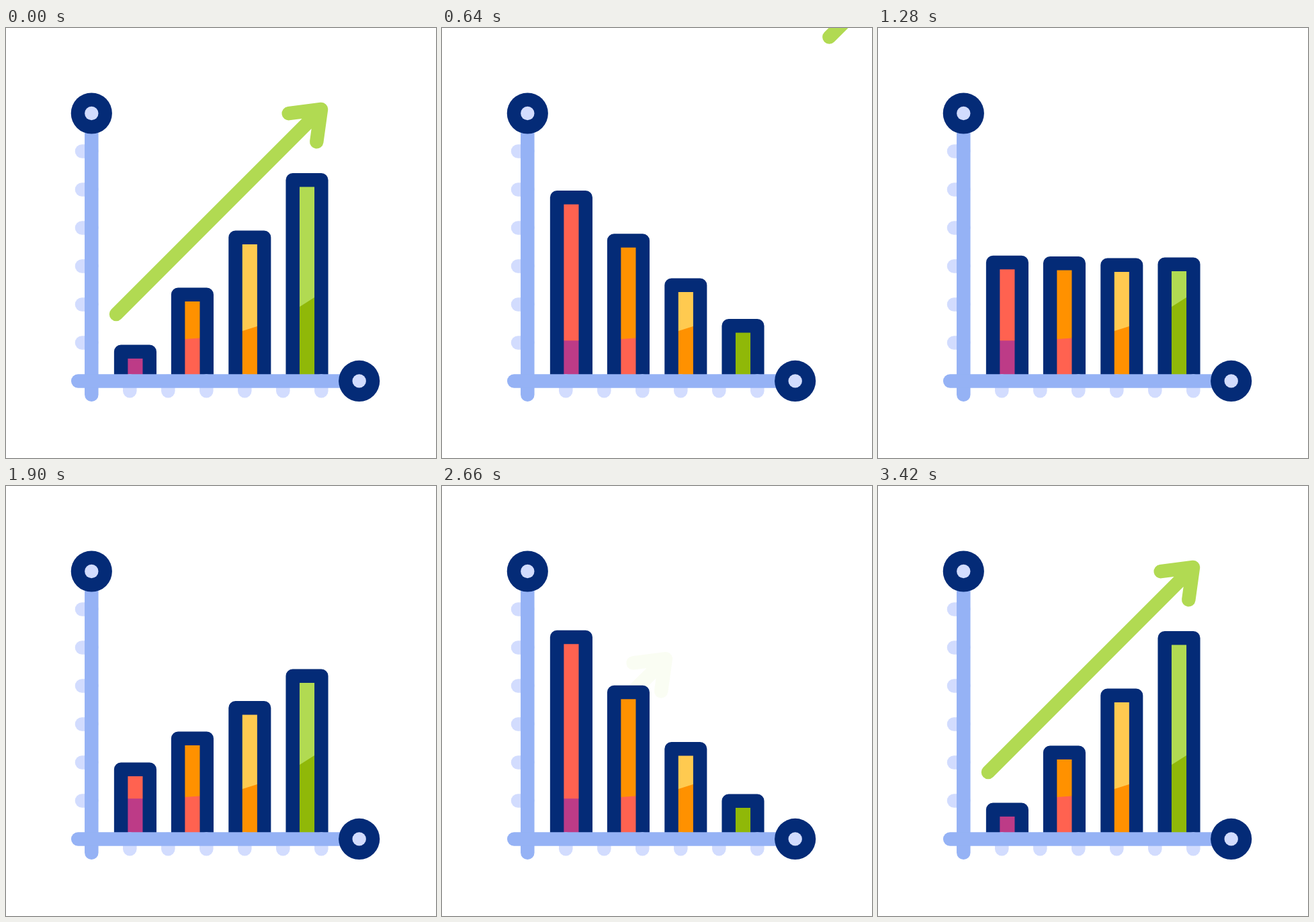
These frames come from a looping animation (640x640 px, 3.62 s). An HTML page with a canvas:

```html
<!DOCTYPE html>
<html lang="en">
<head>
<meta charset="utf-8">
<title>Growth chart</title>
<style>
  html, body { margin: 0; width: 100%; height: 100%; overflow: hidden; background: #fff; }
  canvas { display: block; width: 100vmin; height: 100vmin; }
</style>
</head>
<body>
<canvas id="stage" width="640" height="640"></canvas>
<script>
const ctx = document.getElementById('stage').getContext('2d');
const LOOP = 3620, END = 3420, WIDTH = 20.5, BASE = 515.5;
const NAVY = '#042b77', BLUE = '#95b2f5', PALE = '#d2dcfe', GREEN = '#b1da52';

// x: centre, top: resting top edge, gain: travel per unit of swing,
// split: left and right height of the colour boundary
const bars = [
  { x: 192.4, top: 471.5, gain: -1,    split: [465.3, 465.3], low: '#bd3b87', high: '#ff6250' },
  { x: 277.4, top: 386.5, gain: -0.35, split: [463, 461.5],   low: '#ff6250', high: '#ff9100' },
  { x: 362.8, top: 301.4, gain: 0.31,  split: [451, 444],     low: '#ff9100', high: '#ffca50' },
  { x: 448,   top: 216,   gain: 0.945, split: [415, 401],     low: '#90b808', high: GREEN }
];

// time, swing, easing into this step
const smooth = u => u * u * (3 - 2 * u);
const launch = bezier(0.43, 0.75);
const swingKeys = [
  [0, 0, smooth],
  [843, 290, launch],
  [1672, 0, smooth],
  [2455, 290, smooth],
  [3430, 0, smooth]
];

// cubic-bezier(x1, 0, x2, 1)
function bezier(x1, x2) {
  return x => {
    let lo = 0, hi = 1;
    for (let i = 0; i < 24; i++) {
      const u = (lo + hi) / 2, v = 1 - u;
      if (3 * v * v * u * x1 + 3 * v * u * u * x2 + u ** 3 < x) lo = u;
      else hi = u;
    }
    return smooth(lo);
  };
}

const clamp = u => Math.min(1, Math.max(0, u));

function swingAt(t) {
  if (t >= END) return 0;
  const i = swingKeys.findIndex(key => t < key[0]);
  const [t0, a] = swingKeys[i - 1];
  const [t1, b, ease] = swingKeys[i];
  return a + (b - a) * ease((t - t0) / (t1 - t0));
}

function line(color, ...points) {
  ctx.strokeStyle = color;
  ctx.beginPath();
  points.forEach(([x, y]) => ctx.lineTo(x, y));
  ctx.stroke();
}

function disc(x, y, r, color) {
  ctx.fillStyle = color;
  ctx.beginPath();
  ctx.arc(x, y, r, 0, Math.PI * 2);
  ctx.fill();
}

// head and tail shift along the diagonal, up and to the right
function drawArrow(head, tail, alpha) {
  const tip = [469 + head, 121 - head];
  ctx.globalAlpha = alpha;
  ctx.strokeStyle = GREEN;
  ctx.beginPath();
  ctx.moveTo(164 + tail, 426 - tail);
  ctx.lineTo(...tip);
  ctx.moveTo(420.7 + head, 127.2 - head);
  ctx.lineTo(...tip);
  ctx.lineTo(462.3 + head, 169.3 - head);
  ctx.stroke();
  ctx.globalAlpha = 1;
}

function arrowAt(t) {
  if (t >= END) return drawArrow(0, 0, 1);
  if (t < 843) {
    const shift = 521 * launch(t / 843);
    return drawArrow(shift, shift, 1);
  }
  const alpha = clamp((t - 2610) / 785);
  const left = END - t;
  if (alpha > 0) drawArrow(-281 * smooth(left / 1550), 0.128 * left, alpha);
}

function drawBar({ x, top, gain, split, low, high }, swing) {
  const y = top + gain * swing + WIDTH / 2;
  const l = x - 21.3, r = x + 21.3;
  ctx.save();
  ctx.beginPath();
  ctx.rect(l, y, r - l, BASE + 5 - y);
  ctx.clip();
  ctx.fillStyle = high;
  ctx.fillRect(l, y, r - l, BASE + 5 - y);
  ctx.fillStyle = low;
  // carry the boundary slope out under the outline
  const extra = (split[0] - split[1]) * 0.46;
  ctx.beginPath();
  ctx.moveTo(l, split[0] + extra);
  ctx.lineTo(r, split[1] - extra);
  ctx.lineTo(r, BASE + 5);
  ctx.lineTo(l, BASE + 5);
  ctx.fill();
  ctx.restore();
  line(NAVY, [l, BASE + 5], [l, y], [r, y], [r, BASE + 5]);
}

function drawAxes() {
  for (let i = 0; i < 6; i++) {
    const step = i * 57;
    line(PALE, [113, 183.4 + step], [127.3, 183.4 + step]);
    line(PALE, [184.3 + step, 525.5], [184.3 + step, 540.2]);
  }
  line(BLUE, [127.3, 127], [127.3, 545.7]);
  line(BLUE, [107.2, 525.4], [525.7, 525.4]);
  for (const [x, y] of [[127.3, 127], [525.7, 525.4]]) {
    disc(x, y, 30.6, NAVY);
    disc(x, y, 10.2, PALE);
  }
}

function draw(t) {
  ctx.fillStyle = '#fff';
  ctx.fillRect(0, 0, 640, 640);
  ctx.lineWidth = WIDTH;
  ctx.lineCap = ctx.lineJoin = 'round';
  arrowAt(t);
  const swing = swingAt(t);
  ctx.save();
  ctx.beginPath();
  ctx.rect(0, 0, 640, BASE + 5);
  ctx.clip();
  bars.forEach(bar => drawBar(bar, swing));
  ctx.restore();
  drawAxes();
}

const start = performance.now();
function frame() {
  draw((performance.now() - start) % LOOP);
  requestAnimationFrame(frame);
}
frame();
</script>
</body>
</html>
```
